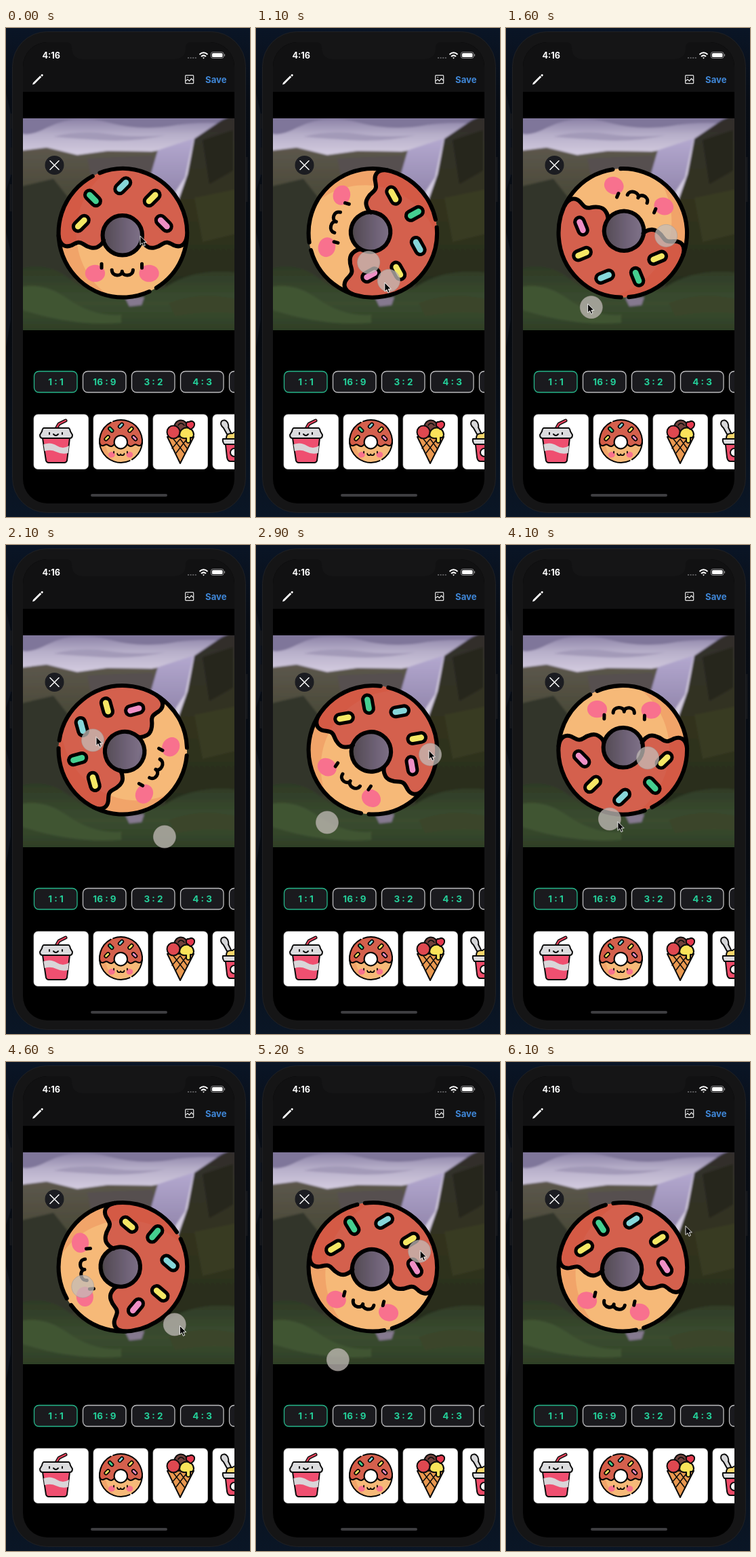
An HTML page that plays this animation: 360x720 px, repeating every 6200 ms.

```html
<!DOCTYPE html>
<html lang="en">
<head>
<meta charset="utf-8">
<title>Sticker editor</title>
<style>
html, body { margin: 0; width: 100%; height: 100%; overflow: hidden; background: #060b14; }
svg { display: block; width: 360px; height: 720px; }
text { font-family: Inter, Roboto, sans-serif; font-weight: 700; }
.ink { fill: none; stroke: #000; stroke-linecap: round; stroke-linejoin: round; }
.art { stroke: #0b0b0b; stroke-width: 2; stroke-linecap: round; stroke-linejoin: round; }
.line { fill: none; }
</style>
</head>
<body>
<svg viewBox="0 0 360 720" xmlns="http://www.w3.org/2000/svg">
  <defs>
    <linearGradient id="desk" x2="0" y2="1">
      <stop offset="0" stop-color="#0a1526"/><stop offset=".15" stop-color="#080d15"/>
      <stop offset=".65" stop-color="#070b11"/><stop offset="1" stop-color="#0a1626"/>
    </linearGradient>
    <linearGradient id="sky" x2="0" y2="1" gradientUnits="userSpaceOnUse" y1="133" x1="0">
      <stop offset="0" stop-color="#8f85a8"/><stop offset="1" stop-color="#d6cfe2"/>
    </linearGradient>
    <linearGradient id="air" gradientUnits="userSpaceOnUse" x1="0" y1="133" x2="0" y2="186">
      <stop offset="0" stop-color="#8b81a6"/><stop offset=".45" stop-color="#b6aec9"/><stop offset="1" stop-color="#d3cbdf"/>
    </linearGradient>
    <linearGradient id="hill" x2="0" y2="1">
      <stop offset="0" stop-color="#5c564c"/><stop offset=".25" stop-color="#4a4a38"/><stop offset="1" stop-color="#2a2f24"/>
    </linearGradient>
    <linearGradient id="cliff" x2="0" y2="1">
      <stop offset="0" stop-color="#322e2e"/><stop offset=".5" stop-color="#32331f"/><stop offset="1" stop-color="#262c1c"/>
    </linearGradient>
    <linearGradient id="fall" x2="0" y2="1">
      <stop offset="0" stop-color="#b3a8cf"/><stop offset=".4" stop-color="#9488ae"/><stop offset="1" stop-color="#544a5a"/>
    </linearGradient>
    <linearGradient id="mist">
      <stop offset="0" stop-color="#4d454c"/><stop offset=".45" stop-color="#6f6277"/><stop offset="1" stop-color="#93869f"/>
    </linearGradient>
    <linearGradient id="bush" x2="0" y2="1">
      <stop offset="0" stop-color="#2e3a26"/><stop offset=".5" stop-color="#3a4c2f"/><stop offset="1" stop-color="#2a3a23"/>
    </linearGradient>
    <filter id="soft" x="-10%" y="-10%" width="120%" height="120%"><feGaussianBlur stdDeviation="1.8"/></filter>
    <clipPath id="screen"><rect x="25" y="21" width="312" height="679" rx="36"/></clipPath>
    <clipPath id="photo"><rect x="25" y="133" width="312" height="312"/></clipPath>
    <clipPath id="ring"><path clip-rule="evenodd" d="M-94 0A94 94 0 1 0 94 0A94 94 0 1 0-94 0ZM-29.5 3.5A29 29 0 1 0 28.5 3.5A29 29 0 1 0-29.5 3.5Z"/></clipPath>

    <g id="donut">
      <g clip-path="url(#ring)">
        <rect x="-95" y="-95" width="190" height="190" fill="#f6b978"/>
        <path fill="#d4604d" d="M-98-98V4H-94C-92 20-82 21-75 18C-67 14-64 12-58 16C-51 21-42 24-36 20C-31 17-29 14-28 11H28C29 14 31 17 36 20C42 24 51 21 58 16C64 12 67 14 75 18C82 21 92 20 94 4H98V-98Z"/>
        <path fill="#d63c20" opacity=".17" d="M-20-92A94 94 0 0 0-20 92A112 112 0 0 1-20-92Z"/>
      </g>
      <g class="ink" stroke-width="6">
        <path id="drip" d="M-94 4C-92 20-82 21-75 18C-67 14-64 12-58 16C-51 21-42 24-36 20C-31 17-29 14-28 11"/>
        <use href="#drip" transform="scale(-1 1)"/>
        <circle cx="-.5" cy="3.5" r="29"/>
        <g id="rim"></g>
      </g>
      <g id="sprinkles"></g>
      <g fill="#f8718e"><ellipse cx="-40.500" cy="59" rx="14.5" ry="12.5"/><ellipse cx="38.500" cy="59" rx="14.5" ry="12.5"/></g>
      <path class="ink" stroke-width="5" d="M-31 45V51M28 45V51M-16 54C-16 64-1 64-1 56C-1 64 15 64 15 54"/>
    </g>
  </defs>

  <rect width="360" height="720" fill="url(#desk)"/>
  <path d="M0 95L8 130V215L0 240ZM0 300L7 330V430L0 470Z" fill="#111620"/>
  <path d="M7 126V148M7 176V216M7 230V270M355 190V256" stroke="#16181c" stroke-width="3"/>
  <rect x="9.5" y="5.5" width="344" height="708" rx="51" fill="#151516" stroke="#202124"/>

  <g clip-path="url(#screen)">
    <rect x="25" y="20" width="312" height="682" fill="#000"/>
    <rect x="25" y="20" width="312" height="74" fill="#111112"/>
    <g clip-path="url(#photo)"><g filter="url(#soft)">
      <rect x="10" y="120" width="342" height="340" fill="url(#air)"/>
      <path d="M10 120H352V143Q290 136 245 144T150 139T60 147T10 142Z" fill="#7f769a"/>
      <path d="M70 160Q110 150 150 156T235 158Q190 168 140 165T70 160Z" fill="#a39ab8"/>
      <path d="M10 182L60 176L105 187L150 181L215 182L250 176V460H10Z" fill="url(#hill)"/>
      <path d="M120 192L215 188L232 230L190 262L130 240Z" fill="#574f50"/>
      <path d="M10 236L70 222L100 260L100 370H10Z" fill="#30342a"/>
      <path d="M138 255L225 225L228 350L150 360Z" fill="url(#mist)"/>
      <path d="M224 180L276 163L264 220L244 250L224 360H192L205 245Z" fill="url(#fall)"/>
      <path d="M352 120L318 136L278 163L268 215L254 255L232 345L236 390H352Z" fill="url(#cliff)"/>
      <path d="M290 165L335 150V210L300 230Z" fill="#28251f"/>
      <path d="M278 250L352 235V300L290 315Z" fill="#373a22"/>
      <path d="M10 358Q55 340 92 368T170 390L232 384Q280 350 352 362V460H10Z" fill="url(#bush)"/>
      <path d="M176 398L204 396L200 408L182 410Z" fill="#85798f"/>
      <path d="M10 385Q50 370 90 398T170 422V434Q90 440 10 410Z" fill="#405533"/>
      <path d="M240 405Q290 385 352 402V422Q300 414 250 424Z" fill="#3a442c"/>
    </g></g>
    <g id="ratios" font-size="13.500" text-anchor="middle" fill="#24cf99"></g>
    <g id="cards" fill="#fff"></g>

    <g class="art">
      <path class="line" d="M74 590L78 583L88 578" stroke-width="5"/>
      <path class="line" d="M74 590L78 583L88 578" style="stroke:#e5405a;stroke-width:2.4"/>
      <path d="M54 604L59 637Q60 640 63 640H86Q89 640 90 637L94 604Z" fill="#ef4f70"/>
      <path d="M55.5 613Q66 609 75 615T93 615L91.5 626Q82 628 74 624T57 623Z" fill="#d9d5d8" stroke="none"/>
      <path d="M56 589H92Q94 589 95 594L98 599Q98 604 94 604H54Q50 604 50 599L53 594Q54 589 56 589Z" fill="#dcdcde"/>
      <path class="line" d="M64 596V598M83 596V598M70 598Q73.500 602 77 598"/>
    </g>
    <use href="#donut" transform="translate(169.500 608.500)scale(.335)"/>
    <g class="art">
      <path d="M238 602L257 641L277 602Z" fill="#e9984f"/>
      <path class="line" stroke-width="1.500" d="M247 605L264 627M257 605L268 620M267 605L250 627M257 605L245 619"/>
      <circle cx="258" cy="587" r="9.500" fill="#70413b"/>
      <path class="line" d="M254 585Q258 579 263 585" stroke-width="1.500"/>
      <circle cx="247" cy="595" r="9.500" fill="#df4850"/>
      <path d="M256 599A10.500 10.500 0 1 1 277 599Q276 604 272 603V609Q269 613 266 609V604Q257 605 256 599Z" fill="#fae35a"/>
      <path d="M272 591L266 586Q265 579 270 580Q275 577 278 582Q279 588 272 591Z" fill="#e3394f"/>
    </g>
    <g class="art">
      <path d="M326 598L321 589Q315 584 318 579Q323 575 327 581Q329 586 328 588L333 598Z" fill="#d6d6d8"/>
      <path d="M325 604Q325 596 334 597Q340 592 350 598V610H325Z" fill="#f7d56a"/>
      <path d="M323 605H350V638H331Q327 638 326 632Z" fill="#ee4a68"/>
      <path d="M320 605H350V613H322Q319 609 320 605Z" fill="#dcdcde"/>
      <circle cx="337" cy="625" r="6" fill="#fff"/>
    </g>
    <rect x="125" y="686" width="113" height="4" rx="2" fill="#3d3d40"/>
  </g>

  <path d="M88 20Q97 21 97 29Q97 46 115 46H247Q265 46 265 29Q265 21 274 20Z" fill="#151516"/>
  <text x="53.500" y="45" font-size="12.700" fill="#fff">4:16</text>
  <path d="M268 44H281" stroke="#5a5a5d" stroke-width="2" stroke-dasharray="2 1.600"/>
  <g fill="none" stroke="#fff" stroke-width="2"><path d="M285.500 39Q291.500 33.500 297.500 39M288 42Q291.500 38.800 295 42"/><path d="M290 43.500H293L291.500 45.500Z" fill="#fff" stroke="none"/></g>
  <rect x="302.500" y="35.500" width="18.500" height="9" rx="2.700" fill="none" stroke="#8b8b8d"/>
  <rect x="304" y="37" width="15.500" height="6" rx="1.500" fill="#fff"/><path d="M322.500 38.500V41.500" stroke="#8b8b8d" stroke-width="1.200"/>
  <path d="M39 83.500L40 80.600L50.300 70.300L52.300 72.300L42 82.600ZM51.200 69.400L52.500 68.200Q53.300 67.600 54 68.200L54.500 68.700Q55.200 69.500 54.500 70.200L53.200 71.500Z" fill="#fff"/>
  <g fill="none" stroke="#e4e4e4" stroke-width="1.200"><rect x="264.700" y="69.700" width="12" height="12" rx="1"/><path d="M265 78L268 75.500L270.500 78L273.500 74.500L276.500 77.500M267.500 72.500H269"/></g>
  <text x="294" y="80.700" font-size="13.200" fill="#3f86d6">Save</text>

  <use id="sticker" href="#donut"/>
  <circle cx="71.500" cy="202" r="14" fill="#1b1c21"/>
  <path d="M65 195.500L78 208.500M78 195.500L65 208.500" stroke="#fff" stroke-width="1.500" stroke-linecap="round"/>
  <g id="touches" fill="#c4bdb9" fill-opacity=".74" stroke="#a59d99" stroke-opacity=".6"><circle r="16.500"/><circle r="16.500"/></g>
  <path id="cursor" d="M0 0V13L3 10.200L5 15L7.300 14L5.300 9.400H9.300Z" fill="#000" stroke="#fff" stroke-width=".9" stroke-linejoin="round"/>
</svg>
<script>
const LOOP = 6200, STEP = 100;
const DOWN = 300, UP = 5700, REST = 6100;
const PIVOT = [181, 358.5], END = [265, 241.5];
const byId = id => document.getElementById(id);
const rad = deg => deg * Math.PI / 180;

// time, sticker angle, finger angle, finger radius, cursor offset x and y
const KEYS = [
  [300, 0, -72, 55, 0, 0],
  [1100, 106, 42, 20, -6, 3],
  [1500, 183, 117, 72, -6, -5],
  [2100, 299.5, 233.3, 88.6, 5, -5],
  [2700, 402, 334, 92, 0, 0],
  [2900, 395, 326.7, 91, -2, -6],
  [4100, 181, 122, 53, 12, 4],
  [5200, 14, -53, 100, 1, -1],
  [5700, 12.5, -54, 100, 0, 0]
];

function slope(i, c) {
  if (i === 0 || i === KEYS.length - 1) return 0;
  const rate = j => (KEYS[j + 1][c] - KEYS[j][c]) / (KEYS[j + 1][0] - KEYS[j][0]);
  const a = rate(i - 1), b = rate(i);
  return a * b <= 0 ? 0 : 2 * a * b / (a + b);
}

function sample(t, c) {
  t = Math.min(Math.max(t, DOWN), UP);
  let i = 0;
  while (i < KEYS.length - 2 && t > KEYS[i + 1][0]) i++;
  const p = KEYS[i], q = KEYS[i + 1], span = q[0] - p[0], u = (t - p[0]) / span;
  const v = 1 - u;
  return p[c] * (1 + 2 * u) * v * v + q[c] * u * u * (3 - 2 * u)
    + span * u * v * (slope(i, c) * v - slope(i + 1, c) * u);
}

function arc(from, to) {
  const at = a => `${94 * Math.cos(rad(a))} ${94 * Math.sin(rad(a))}`;
  return `<path d="M${at(from)}A94 94 0 ${to - from > 180 ? 1 : 0} 1 ${at(to)}"/>`;
}

function build() {
  byId('rim').innerHTML = arc(-111, 58.5) + arc(65.5, 242);
  byId('sprinkles').innerHTML = [
    [-61, -14, -45, '#f5e765'], [-44, -51, 45, '#45cf90'], [0, -69, -45, '#86d6d9'],
    [43, -51, -45, '#f5e765'], [60, -14, 45, '#ef8fc6']
  ].map(([x, y, a, color]) => `<g transform="translate(${x} ${y})rotate(${a})" class="ink">
    <path d="M-6.500 0H6.500" stroke-width="18.500"/><path d="M-6.500 0H6.500" stroke-width="8.500" style="stroke:${color}"/></g>`).join('');
  byId('ratios').innerHTML = ['1 : 1', '16 : 9', '3 : 2', '4 : 3', ''].map((label, i) => {
    const x = 41 + 72 * i;
    return `<rect x="${x + .5}" y="505.500" width="63.500" height="31" rx="7" fill="#1a1a1e" stroke="${i ? '#bdbdbf' : '#25b78a'}" stroke-width="1.300"/>
      <text x="${x + 32.5}" y="526">${label}</text>`;
  }).join('');
  byId('cards').innerHTML = [0, 1, 2, 3].map(i =>
    `<rect x="${41 + 88 * i}" y="569" width="80.500" height="80.500" rx="6" stroke="#d2d2d2" stroke-width=".7"/>`).join('');
}

const move = (el, x, y) => el.setAttribute('transform', `translate(${x} ${y})`);

function draw(t) {
  byId('sticker').setAttribute('transform', `translate(172.3 301.8)rotate(${sample(t, 1)})scale(1.008)`);
  const a = rad(sample(t, 2)), r = sample(t, 3);
  const dx = r * Math.cos(a), dy = r * Math.sin(a);
  const [near, far] = byId('touches').children;
  move(near, PIVOT[0] + dx, PIVOT[1] + dy);
  move(far, PIVOT[0] - dx, PIVOT[1] - dy);
  byId('touches').style.display = t >= DOWN && t < UP ? '' : 'none';

  const k = Math.min(Math.max((t - UP) / (REST - UP), 0), 1);
  const x = PIVOT[0] + dx + sample(t, 4), y = PIVOT[1] + dy + sample(t, 5);
  move(byId('cursor'), x + (END[0] - x) * k, y + (END[1] - y) * k);
}

build();
const start = performance.now();
function tick() {
  const t = (performance.now() - start) % LOOP;
  draw(Math.floor(t / STEP) * STEP);
  requestAnimationFrame(tick);
}
tick();
</script>
</body>
</html>
```
